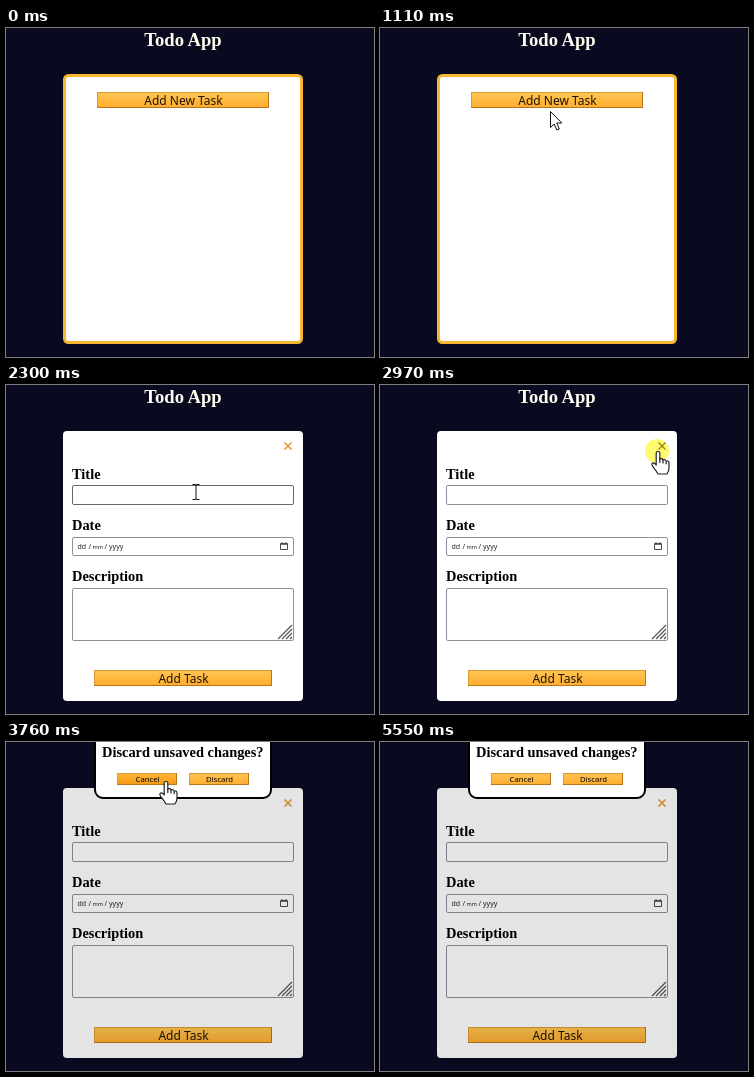
An HTML page that plays this animation: 368x329 px, repeating every 6830 ms.

```html
<!DOCTYPE html>
<html lang="en">
<head>
<meta charset="utf-8">
<title>Todo App</title>
<style>
  html, body { margin: 0; width: 100%; height: 100%; overflow: hidden; background: #09091f; }
  svg { display: block; width: 368px; height: 329px; }
  text { font: bold 14.4px "Liberation Serif", "Times New Roman", serif; }
  .heading { font-size: 18.6px; fill: #fffdf0; text-anchor: middle; }
  .label { font: 12px "Noto Sans", sans-serif; fill: #1c1408; text-anchor: middle; }
  .small { font-size: 7.7px; fill: #000; }
  .hint { font: 7px "Noto Sans", sans-serif; fill: #222; }
  .field { fill: #fff; stroke: #8f8f9d; }
  .field.hover { stroke: #676774; }
  .face { fill: url(#amber); }
  .hover .face { fill: url(#amberHover); }
  .close { stroke: #ea963c; stroke-width: 1.7; }
  .close.hover { stroke: #8f7d30; stroke-width: 1.1; }
</style>
</head>
<body>
<svg viewBox="0 0 368 329">
  <defs>
    <linearGradient id="amber" x2="0" y2="1">
      <stop stop-color="#ffc552"/><stop offset="1" stop-color="#ffad2f"/>
    </linearGradient>
    <linearGradient id="amberHover" x2="0" y2="1">
      <stop stop-color="#ffb73a"/><stop offset="1" stop-color="#f39a12"/>
    </linearGradient>
  </defs>

  <text class="heading" x="177" y="18">Todo App</text>

  <g id="list">
    <rect x="58.5" y="47.5" width="237" height="267" rx="4" fill="#fff" stroke="#f7b731" stroke-width="3"/>
  </g>

  <g id="form">
    <rect x="57" y="46" width="240" height="270" rx="4" fill="#fff"/>
    <path id="close" class="close" d="M278.5 57.5l7 7m0-7l-7 7"/>
    <text x="66" y="94">Title</text>
    <rect id="titleField" class="field" x="66.5" y="100.5" width="221" height="19" rx="1.5"/>
    <text x="66" y="145">Date</text>
    <rect class="field" x="66.5" y="152.5" width="221" height="18" rx="1.5"/>
    <g class="hint">
      <text class="hint" x="71.5" y="164">dd</text>
      <text class="hint" x="82.5" y="164">/</text>
      <text class="hint" x="86.5" y="164" style="font-size:5.6px">mm</text>
      <text class="hint" x="98.5" y="164">/</text>
      <text class="hint" x="103" y="164">yyyy</text>
    </g>
    <path d="M274.5 158.5h7v6h-7zM274.5 159.3h7M276 157v1M280 157v1" fill="none" stroke="#4a4a50"/>
    <text x="66" y="196">Description</text>
    <rect class="field" x="66.5" y="203.5" width="221" height="52" rx="1.5"/>
    <path d="M272 254l14-14M276 254l10-10M280 254l6-6M284 254l2-2" stroke="#55555c" stroke-width="1.2"/>
  </g>

  <g id="discard">
    <rect x="57" y="46" width="240" height="270" rx="4" opacity=".105"/>
    <rect x="89" y="-12" width="176" height="68" rx="8" fill="#fff" stroke="#000" stroke-width="2"/>
    <text x="96" y="15">Discard unsaved changes?</text>
  </g>

  <circle id="ring" r="12" fill="#fffb70" style="mix-blend-mode:multiply"/>

  <g id="arrow" fill="#fff" stroke="#111">
    <path d="M.5.5V16.5L4.2 13L6.8 19L9.3 18L6.7 12H11.8Z"/>
  </g>
  <g id="hand" fill="#fff" stroke="#222" stroke-width="1.2" stroke-linejoin="round">
    <path d="M-1.8 2Q-1.8.5 0 .5Q1.8.5 1.8 2V8Q4.3 6.8 5 9Q7.4 8 8.2 10.2Q11 9.4 11 12V17Q11 20 9 23H0Q-2 19.5-4.8 16.2Q-7 13-5.4 12Q-4 11.2-1.8 14Z"/>
    <path d="M1.8 8v4M5 9v3.5M8.2 10.2v3" fill="none"/>
  </g>
  <g id="beam" fill="none" stroke="#111">
    <path d="M-3.5-7.5H-1Q0-7.5 0-6.5Q0-7.5 1-7.5H3.5M0-6.5V6.5M-3.5 7.5H-1Q0 7.5 0 6.5Q0 7.5 1 7.5H3.5"/>
  </g>
</svg>
<script>
const LOOP = 6830, STEP = 66.5;
const $ = id => document.getElementById(id);

function button(parent, id, x, y, w, h, label, baseline, small) {
  $(parent).insertAdjacentHTML('beforeend', `<g id="${id}">
    <rect class="face" x="${x + .5}" y="${y + .5}" width="${w - 1}" height="${h - 1}" stroke="#d99a35"/>
    <path d="M${x} ${y + h - .5}H${x + w - .5}V${y}" fill="none" stroke="#b5761c"/>
    <text class="label ${small ? 'small' : ''}" x="${x + w / 2 + .5}" y="${baseline}">${label}</text></g>`);
}
button('list', 'addNew', 91, 64, 172, 16, 'Add New Task', 77);
button('form', 'addTask', 88, 285, 178, 16, 'Add Task', 298);
button('discard', 'cancel', 111, 31, 60, 12, 'Cancel', 40, true);
button('discard', 'confirm', 183, 31, 60, 12, 'Discard', 40, true);

// time, x, y, pointer, steps to the next row (1 = hold)
const path = [
  [0, 0, 0, '', 1],
  [380, 301, 286, 'arrow'],
  [580, 235, 215, 'arrow'],
  [780, 170, 140, 'arrow'],
  [910, 146, 104, 'arrow'],
  [1040, 160, 88, 'arrow'],
  [1110, 170, 83, 'arrow', 1],
  [1170, 172, 67, 'hand', 1],
  [1570, 174, 70, 'arrow', 1],
  [1640, 179, 77, 'arrow', 1],
  [2040, 176, 80, 'arrow'],
  [2170, 169, 87, 'arrow'],
  [2300, 190, 107, 'beam'],
  [2440, 230, 103, 'beam'],
  [2570, 262, 82, 'arrow'],
  [2700, 278, 66, 'hand', 1],
  [3170, 277, 66, 'arrow', 1],
  [3300, 270, 68, 'arrow'],
  [3500, 225, 70, 'arrow'],
  [3630, 185, 62, 'arrow'],
  [3760, 160, 39, 'hand', 1],
  [3830, 151, 33, 'hand', 1],
  [3890, 143, 25, 'arrow'],
  [4030, 130, 14, 'beam', 1],
  [4500, 142, 13, 'beam'],
  [4830, 250, 7, 'beam', 1],
  [5020, 250, 6, 'beam', 1],
  [5360, 268, 24, 'arrow'],
  [5490, 334, 106, 'arrow', 1],
  [5550, 0, 0, '', 1],
  [LOOP, 0, 0, '', 1]
];

function pointerAt(t) {
  const i = path.findIndex(row => row[0] > t) - 1;
  const [t0, x0, y0, kind, hold] = path[i], [t1, x1, y1] = path[i + 1];
  const steps = hold || Math.max(1, Math.round((t1 - t0) / STEP));
  const u = Math.floor((t - t0) / (t1 - t0) * steps + .01) / steps;
  return { kind, x: Math.round(x0 + (x1 - x0) * u), y: Math.round(y0 + (y1 - y0) * u) };
}

const show = (id, on) => $(id).style.display = on ? '' : 'none';
const hover = (id, on) => $(id).classList.toggle('hover', on);

function draw(t) {
  const p = pointerAt(t);
  const within = (a, b) => t >= a && t < b;
  show('list', t < 1570);
  show('form', t >= 1570);
  show('discard', t >= 3170);
  hover('addNew', within(1170, 1570));
  hover('titleField', within(2300, 2570));
  hover('close', within(2970, 3170));
  hover('cancel', within(3760, 3890));

  show('ring', within(1370, 1570) || within(2970, 3170));
  $('ring').setAttribute('transform', `translate(${p.x - 1} ${p.y})`);
  for (const kind of ['arrow', 'hand', 'beam']) {
    show(kind, kind === p.kind);
    $(kind).setAttribute('transform', `translate(${p.x} ${p.y})`);
  }
}

const start = performance.now();
function tick() {
  draw((performance.now() - start) % LOOP);
  requestAnimationFrame(tick);
}
tick();
</script>
</body>
</html>
```
